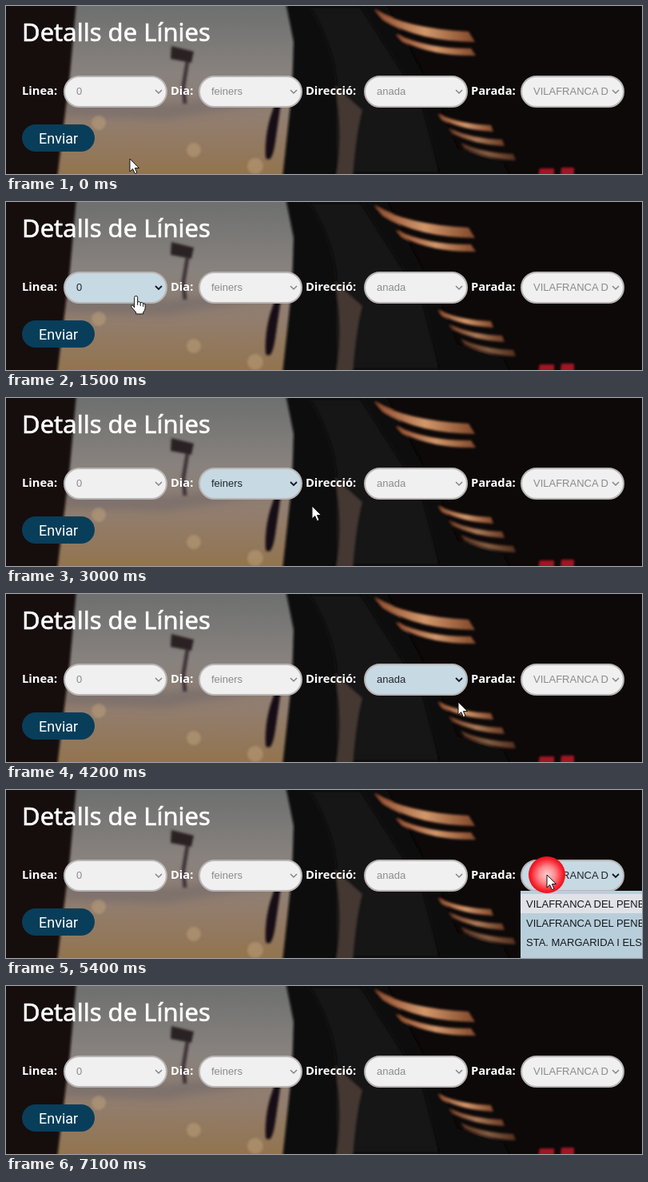
Recreate the animation shown at these times as an HTML page. Size 796 by 210 pixels, loop 7600 ms.

```html
<!DOCTYPE html>
<html lang="ca">
<head>
<meta charset="utf-8">
<title>Detalls de Línies</title>
<style>
html, body { margin: 0; width: 100%; height: 100%; overflow: hidden; background: #0c0909; }
svg { display: block; }
.title { font: 500 31px "Noto Sans", sans-serif; fill: #fff; stroke: #fff; stroke-width: .6; }
.label { font: 700 14.7px "Noto Sans", sans-serif; fill: #fff; }
.button { font: 18px Roboto, sans-serif; fill: #fff; }
.select text, .list text { font: 13px "Liberation Sans", Arial, sans-serif; }
.select rect { fill: #f0f0f1; stroke: #b9b5b5; stroke-width: 2; }
.select text { fill: #8b8b8b; }
.select path { fill: none; stroke: #858585; stroke-width: 1.5; }
.select.on rect { fill: #c7d9e3; }
.select.on text { fill: #20262b; }
.select.on path { stroke: #15191c; stroke-width: 1.8; }
.list text { fill: #15191c; }
#arrow, #hand { fill: #fff; stroke: #111; stroke-linejoin: round; }
</style>
</head>
<body>
<svg width="796" height="210" viewBox="0 0 796 210">
  <defs>
    <linearGradient id="sky" x2="0" y2="1">
      <stop offset="0" stop-color="#6d706f"/>
      <stop offset=".4" stop-color="#88827e"/>
      <stop offset=".7" stop-color="#927d6d"/>
      <stop offset="1" stop-color="#92744f"/>
    </linearGradient>
    <linearGradient id="glow">
      <stop offset="0" stop-color="#8f4c2e"/>
      <stop offset=".5" stop-color="#d2976a"/>
      <stop offset="1" stop-color="#804629"/>
    </linearGradient>
    <radialGradient id="click">
      <stop offset="0" stop-color="#ffd0d0"/>
      <stop offset=".45" stop-color="#ff8a8e"/>
      <stop offset=".85" stop-color="#f9222e"/>
      <stop offset="1" stop-color="#e8101c"/>
    </radialGradient>
    <filter id="soft" x="-20%" y="-20%" width="140%" height="140%"><feGaussianBlur stdDeviation="1.5"/></filter>
    <filter id="haze" x="-50%" y="-50%" width="200%" height="200%"><feGaussianBlur stdDeviation="5"/></filter>
  </defs>

  <!-- dusk seen from a bus cab -->
  <rect width="796" height="210" fill="#0d0909"/>
  <path d="M60 0H362V210H60Z" fill="url(#sky)"/>
  <g filter="url(#haze)">
    <path d="M70 112L200 122 350 105V118L200 142 70 138Z" fill="#6f6668" opacity=".5"/>
    <path d="M370 0H460L500 60 530 130 545 210H412L405 70Z" fill="#191212"/>
  </g>
  <g filter="url(#soft)">
    <path d="M-5-5H88L80 85 64 215H-5Z" fill="#150b09"/>
    <g fill="#c0a37c" opacity=".5">
      <circle cx="116" cy="146" r="9"/>
      <circle cx="235" cy="180" r="9"/>
      <circle cx="312" cy="200" r="10"/>
    </g>
    <path d="M207 50L235 57 232 71 206 66Z" fill="#2c2423"/>
    <path d="M227 70L222 100 224 122" fill="none" stroke="#40363a" stroke-width="5"/>
    <path d="M350-5H376Q410 45 414 100V215H346L358 105 360 45Z" fill="#0e0b0c"/>
    <path d="M337 122Q323 155 325 190 333 198 337 170L344 122Z" fill="#171112"/>
    <path d="M412 100Q422 160 413 215H434Q438 160 446 130Z" fill="#453832"/>
    <path d="M440-5H475L545 130 565 178 622 196 632 215H545L520 120Z" fill="#0a0707"/>
    <g id="vents" fill="url(#glow)">
      <path d="M461 4Q500 28 579 32L587 45Q515 44 472 17Z"/>
      <path d="M488 35Q530 54 582 53L588 62Q535 63 496 44Z"/>
    </g>
    <path d="M668 203H686V212H666ZM695 202H711V212H694Z" fill="#a01426"/>
  </g>

  <text class="title" x="20" y="44">Detalls de Línies</text>
  <rect x="20" y="148" width="91" height="34" rx="17" fill="#083e5a"/>
  <text class="button" x="41" y="172">Enviar</text>
  <g id="form"></g>
  <circle id="ring" r="23" fill="url(#click)"/>
  <path id="arrow" d="M0 0V16L3.7 12.6 6.4 18.7 9 17.5 6.4 11.6H11.5Z"/>
  <path id="hand" d="M-2 14V1.5Q-2-.5 0-.5T2 1.5V7Q4.500 5.500 5.500 8 8 6.500 9 9 11.500 8 11.500 11V15Q11 18 9 20V22H0V20L-6 13Q-6 10.500-4 11.200ZM2 7V11M5.500 8V12M9 9V13"/>
</svg>
<script>
const LOOP = 7600, STEP = 100, TRAVEL = 800, ROW = 24;
const stop1 = "VILAFRANCA DEL PENEDÈS", stop2 = "STA. MARGARIDA I ELS MONJOS";

// a field is lit from focus to blur; its list stays open for `hold` ms
const fields = [
  { label: "Linea:", lx: 20, x: 72, text: "0", focus: 1000, blur: 1900 },
  { label: "Dia:", lx: 206, x: 241, text: "feiners", focus: 2400, blur: 3400 },
  { label: "Direcció:", lx: 375, x: 448, text: "anada", focus: 3500, blur: 5000 },
  { label: "Parada:", lx: 582, x: 644, text: "VILAFRANCA D", focus: 5400, blur: 6800,
    rows: [stop1, stop1, stop2, stop2], width: 160, hold: 600 }
].map(f => ({ rows: [f.text], width: 130, hold: 300, ...f }));

// pointer stops: arrival time, x, y
const stops = [
  [0, 155, 191], [900, 195, 118], [1300, 112, 106], [1800, 256, 140], [2100, 296, 111],
  [3000, 383, 135], [3400, 473, 108], [4200, 566, 135], [5200, 677, 106],
  [6600, 576, 158], [7100, 467, 230]
];

const $ = id => document.getElementById(id);
const show = (el, on) => el.style.display = on ? "" : "none";
const lit = (f, t) => t >= f.focus && t < f.blur;
const isOpen = (f, t) => t >= f.focus && t < f.focus + f.hold;
const clicked = (f, t) => t >= f.focus && t < f.focus + 2 * STEP;

for (let i = 0; i < 3; i++) {
  const vent = `<path d="M${541 + i * 14} ${135 + i * 18}q29 13 66 14l3 8q-38-2-64-15z" opacity="${1 - i * .2}"/>`;
  $("vents").insertAdjacentHTML("beforeend", vent);
}

const select = f => `
  <text class="label" x="${f.lx}" y="111">${f.label}</text>
  <g class="select">
    <rect x="${f.x + 1}" y="88" width="128" height="38" rx="19"/>
    <text x="${f.x + 16}" y="111">${f.text}</text>
    <path d="M${f.x + 115} 105l4 4 4-4"/>
  </g>`;
const list = f => `
  <g class="list">
    <rect x="${f.x}" y="126" width="${f.width}" height="${f.rows.length * ROW + 4}" fill="#b8cfdb"/>
    <rect x="${f.x}" y="130" width="${f.width}" height="${ROW}" fill="#e1e2e7"/>
    ${f.rows.map((row, i) => `<text x="${f.x + 7}" y="${147 + i * ROW}">${row}</text>`).join("")}
  </g>`;
$("form").innerHTML = fields.map(select).join("") + fields.map(list).join("");
const selects = document.querySelectorAll(".select");
const lists = document.querySelectorAll(".list");

// rest at each stop, then glide so as to arrive at the next one on time
function pointer(t) {
  const i = stops.findIndex(s => s[0] > t);
  if (i < 0) return stops.at(-1).slice(1);
  const [t0, x0, y0] = stops[i - 1], [t1, x1, y1] = stops[i];
  const k = Math.max(0, 1 - (t1 - t) / Math.min(TRAVEL, t1 - t0));
  const ease = k * k * (3 - 2 * k);
  return [x0 + (x1 - x0) * ease, y0 + (y1 - y0) * ease];
}

function draw(now) {
  const t = Math.floor(now % LOOP / STEP) * STEP;
  const [x, y] = pointer(t);
  const over = y > 87 && y < 127 && fields.some(f => x > f.x && x < f.x + 130)
    && !fields.some(f => isOpen(f, t));
  fields.forEach((f, i) => {
    selects[i].classList.toggle("on", lit(f, t));
    show(lists[i], isOpen(f, t));
  });
  for (const id of ["ring", "arrow", "hand"]) $(id).setAttribute("transform", `translate(${x} ${y})`);
  show($("ring"), fields.some(f => clicked(f, t)));
  show($("hand"), over);
  show($("arrow"), !over);
  requestAnimationFrame(draw);
}
draw(0);
</script>
</body>
</html>
```
